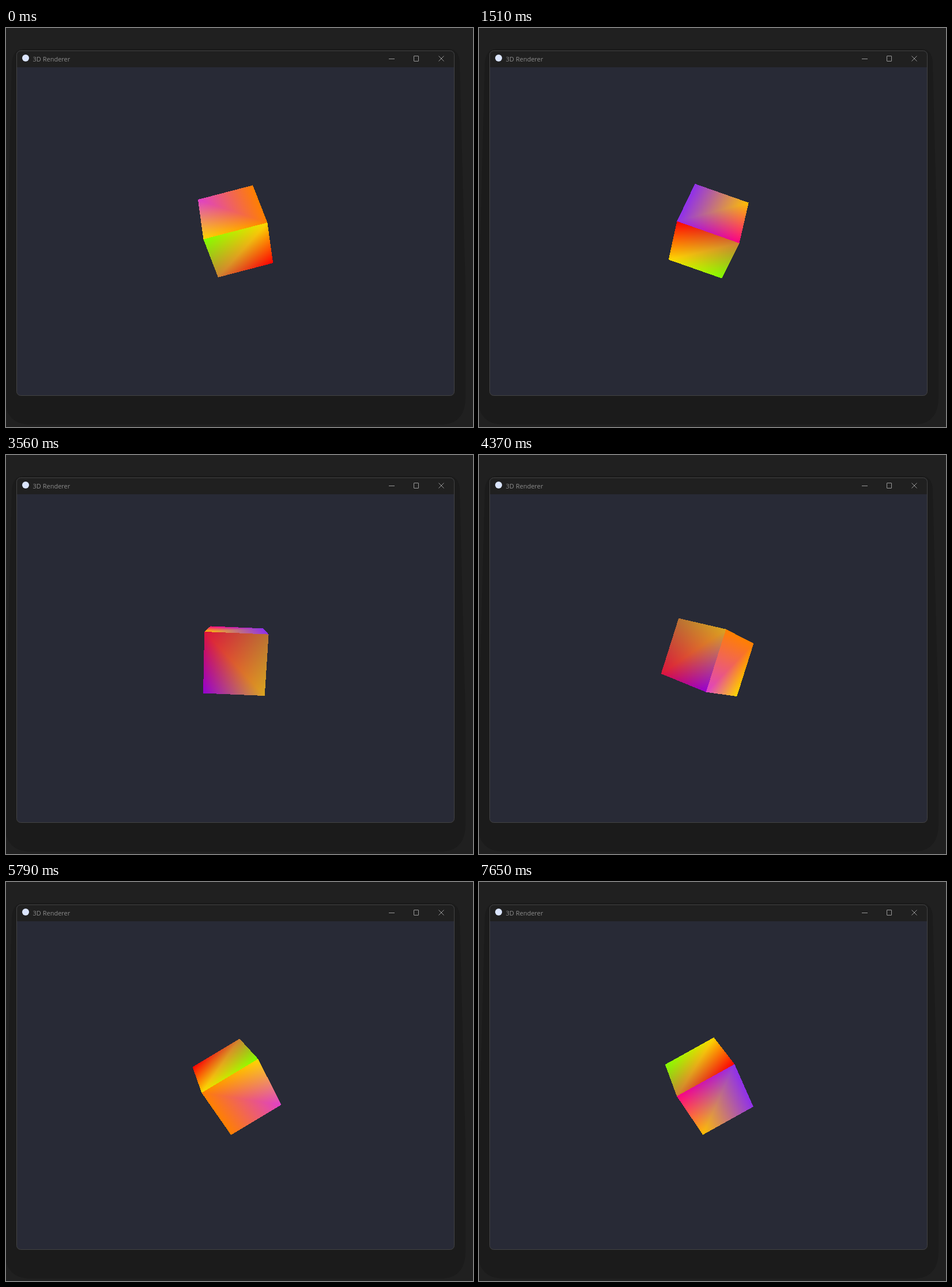
Write an HTML page with a canvas that moves like this. It is 810x691 px and loops after 7.67 s.

```html
<!DOCTYPE html>
<html lang="en">
<head>
<meta charset="utf-8">
<title>3D Renderer</title>
<style>
  html, body { margin: 0; width: 100%; height: 100%; overflow: hidden; background: #202020; }
  svg, canvas { position: absolute; display: block; }
  svg { left: 0; top: 0; }
  canvas { left: 298px; top: 252px; }
  text { font: 11px "Open Sans", sans-serif; fill: #8c8c8c; }
</style>
</head>
<body>
<svg width="810" height="691" viewBox="0 0 810 691">
  <rect width="810" height="691" fill="#202020"/>
  <path d="M10 60Q12 36 32 36H766Q786 36 787 60L797 450V640Q797 687 752 687H44Q-2 687 -2 640L0 450Z" fill="#1b1b1b"/>
  <rect x="18.5" y="39.5" width="759" height="597" rx="7" fill="#282a36"/>
  <path d="M19 68V46.5Q19 40 25.5 40H770.5Q777 40 777 46.5V68Z" fill="#202020"/>
  <rect x="18.5" y="39.5" width="759" height="597" rx="7" fill="none" stroke="#434343"/>
  <circle cx="34" cy="52" r="6" fill="#dbe5ff"/>
  <text x="46.5" y="58">3D Renderer</text>
  <g fill="none" stroke="#999">
    <path d="M664 53.5H674"/>
    <rect x="707.5" y="48.5" width="8" height="9" rx="0.5"/>
    <path d="M750.5 48.5L759.5 57.5M759.5 48.5L750.5 57.5"/>
  </g>
</svg>
<canvas id="view" width="200" height="200"></canvas>
<script>
const SIZE = 200, MID = SIZE / 2, RAD = Math.PI / 180;
const FOCAL = 492, DEPTH = 10;
const LOOP = 7670, LAST = 59, BEAT = 7650 / LAST, LEAD = 32;

const rgb = hex => [1, 3, 5].map(i => parseInt(hex.slice(i, i + 2), 16));

// Four faces around the spin axis; corners run near-low, far-low, far-high, near-high.
const faces = [
  "#de40cb #ff8000 #ff8000 #ffd700",
  "#80ff00 #ffd700 #ff0000 #cd7f32",
  "#ff0080 #8f30eb #8f30eb #ffbf00",
  "#dc143c #b87333 #daa520 #9400d3"
].map((colors, n) => ({
  low: n * 90 - 45,
  split: n === 1 || n === 2 ? 1 : 0,
  colors: colors.split(" ").map(rgb)
}));

const ctx = document.getElementById("view").getContext("2d");
const image = ctx.createImageData(SIZE, SIZE);

// Redraws come a little faster in the first half of the loop than in the second.
const beatTime = n => n * BEAT - 58 * Math.sin(Math.PI * n / LAST);

// The cube spins around its own axis while that axis rolls in the screen plane.
const poseAt = time => ({
  roll: (-14.6 - 0.096 * time) * RAD,
  spin: (45.4 + 0.0597 * time) * RAD
});

function project(side, angle, pose) {
  const turn = angle * RAD - pose.spin;
  const scale = FOCAL / (DEPTH - Math.SQRT2 * Math.cos(turn));
  const x = side * scale, y = Math.SQRT2 * Math.sin(turn) * scale;
  const c = Math.cos(pose.roll), s = Math.sin(pose.roll);
  return { x: MID + x * c - y * s, y: MID + x * s + y * c };
}

const cross = (a, b, x, y) => (b.x - a.x) * (y - a.y) - (b.y - a.y) * (x - a.x);

function fillTriangle(p, q, r) {
  const area = cross(p, q, r.x, r.y);
  if (area <= 0) return;
  const x0 = Math.floor(Math.min(p.x, q.x, r.x)), x1 = Math.ceil(Math.max(p.x, q.x, r.x));
  const y0 = Math.floor(Math.min(p.y, q.y, r.y)), y1 = Math.ceil(Math.max(p.y, q.y, r.y));
  for (let y = y0; y < y1; y++) {
    for (let x = x0; x < x1; x++) {
      const wp = cross(q, r, x + 0.5, y + 0.5) / area;
      const wq = cross(r, p, x + 0.5, y + 0.5) / area;
      const wr = 1 - wp - wq;
      if (Math.min(wp, wq, wr) < -1e-9) continue;
      const at = (y * SIZE + x) * 4;
      for (let i = 0; i < 3; i++) {
        image.data[at + i] = wp * p.color[i] + wq * q.color[i] + wr * r.color[i];
      }
      image.data[at + 3] = 255;
    }
  }
}

function draw(time) {
  const pose = poseAt(time);
  image.data.fill(0);
  for (const { low, split, colors } of faces) {
    const corners = colors.map((color, i) => {
      const side = i === 1 || i === 2 ? 1 : -1;
      return { ...project(side, i < 2 ? low : low + 90, pose), color };
    });
    const at = i => corners[(i + split) % 4];
    fillTriangle(at(0), at(1), at(2));
    fillTriangle(at(0), at(2), at(3));
  }
  ctx.putImageData(image, 0, 0);
}

const start = performance.now();
let shown = -1;

function update() {
  const time = (performance.now() - start) % LOOP;
  let beat = 0;
  while (beat < LAST && beatTime(beat + 1) - LEAD <= time) beat++;
  if (beat !== shown) draw(beatTime(shown = beat));
  requestAnimationFrame(update);
}
update();
</script>
</body>
</html>
```
